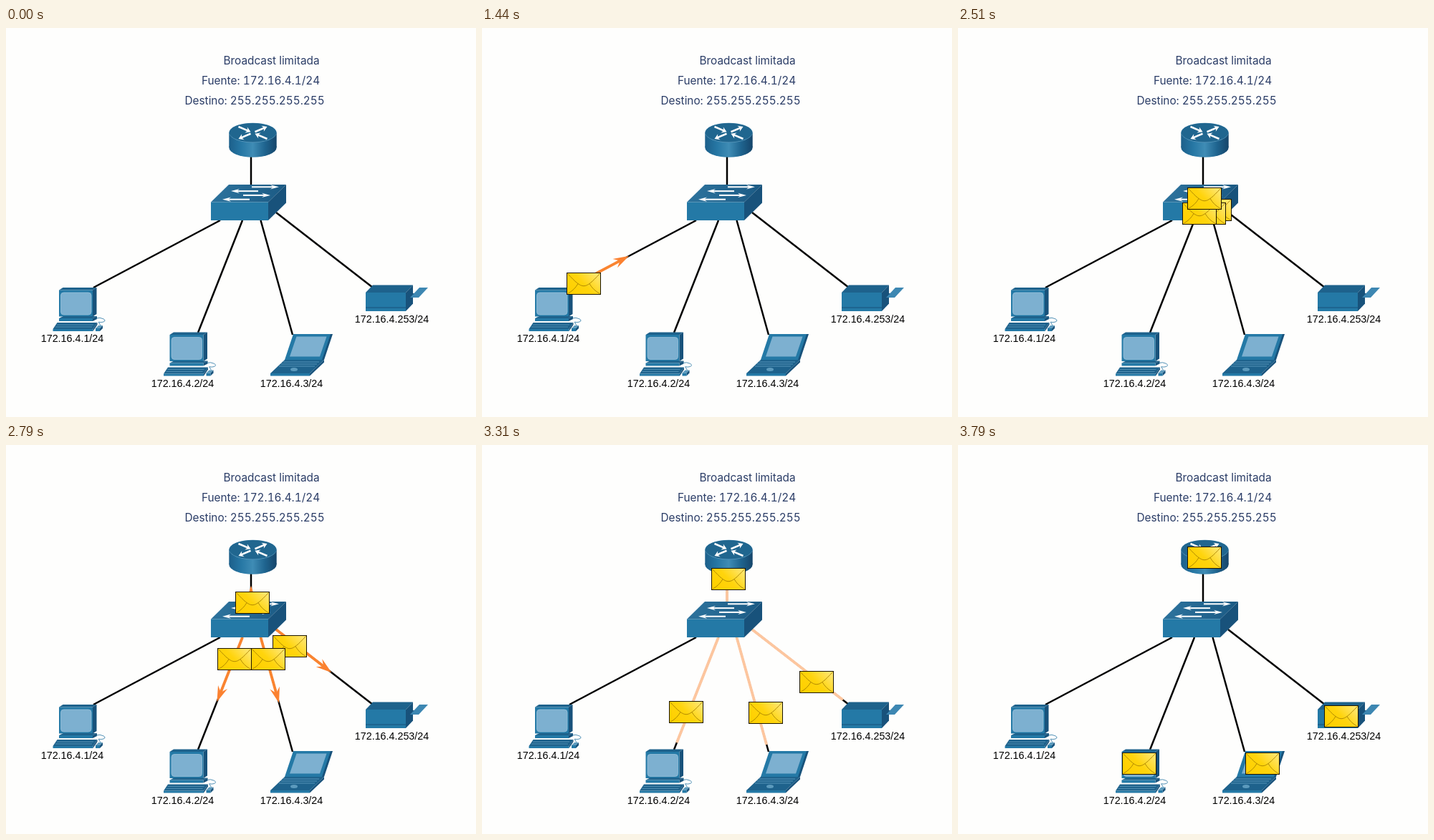
Write an HTML page with a canvas that moves like this. It is 656 by 544 pixels and loops after 4890 ms.

```html
<!DOCTYPE html>
<html lang="es">
<head>
<meta charset="utf-8">
<title>Broadcast limitada</title>
<style>
html, body { margin: 0; width: 100%; height: 100%; overflow: hidden; background: #fefefd; }
canvas, svg { position: absolute; left: 0; top: 0; width: 656px; height: 544px; }
.title { font: 15.35px Inter, sans-serif; font-variant-numeric: tabular-nums; fill: #2a3c66; }
.host { font: 14.3px "Liberation Sans", Arial, sans-serif; text-anchor: middle; }
</style>
</head>
<body>
<canvas id="stage" width="656" height="544"></canvas>
<svg viewBox="0 0 656 544">
  <g class="title">
    <text x="303.5" y="51">Broadcast limitada</text>
    <text x="273" y="79">Fuente: 172.16.4.1/24</text>
    <text x="249.5" y="107">Destino: 255.255.255.255</text>
  </g>
  <g class="host">
    <text x="92.5" y="439">172.16.4.1/24</text>
    <text x="246.5" y="502">172.16.4.2/24</text>
    <text x="398.5" y="502">172.16.4.3/24</text>
    <text x="538.5" y="412">172.16.4.253/24</text>
  </g>
</svg>
<script>
const ctx = document.getElementById('stage').getContext('2d');
const LOOP = 4890;
const BLUE = '#2479a6', DARK = '#1e628c', DEEP = '#18527b', LIGHT = '#5c9abd', SCREEN = '#7db0d0';

const clamp = v => Math.min(1, Math.max(0, v));
const span = (t, a, b) => clamp((t - a) / (b - a));
const lerp = (a, b, p) => a + (b - a) * p;
const between = (a, b, p) => a.map((v, i) => lerp(v, b[i], p));

function at([x, y], angle, draw) {
  ctx.save();
  ctx.translate(x, y);
  ctx.rotate(angle);
  draw();
  ctx.restore();
}

function line(a, b, color, width) {
  ctx.beginPath();
  ctx.moveTo(...a);
  ctx.lineTo(...b);
  ctx.strokeStyle = color;
  ctx.lineWidth = width;
  ctx.stroke();
}

function ellipse(x, y, rx, ry, fill) {
  ctx.beginPath();
  ctx.ellipse(x, y, rx, ry, 0, 0, Math.PI * 2);
  ctx.fillStyle = fill;
  ctx.fill();
}

function ramp(x0, y0, x1, y1, ...colors) {
  const g = ctx.createLinearGradient(x0, y0, x1, y1);
  colors.forEach((c, i) => g.addColorStop(i / (colors.length - 1), c));
  return g;
}

// Parallelogram spanned from a corner by two edges
function facet(fill, x, y, ax, ay, bx, by) {
  ctx.beginPath();
  ctx.moveTo(x, y);
  ctx.lineTo(x + ax, y + ay);
  ctx.lineTo(x + ax + bx, y + ay + by);
  ctx.lineTo(x + bx, y + by);
  ctx.fillStyle = fill;
  ctx.fill();
}

// Box seen from the front, its depth going to the upper right
function slab(x, y, w, h, dx, dy, top = DARK) {
  facet(top, x, y, w, 0, dx, -dy);
  facet(DEEP, x + w, y, 0, h, dx, -dy);
  facet(BLUE, x, y, w, h ? 0 : 1, 0, h);
}

// Arrow along x with swept barbs
function arrow(len, shaft, head, barb, fill) {
  const neck = len - head * 0.65;
  ctx.fillStyle = fill;
  ctx.fillRect(0, -shaft / 2, neck + 1, shaft);
  ctx.beginPath();
  ctx.moveTo(len, 0);
  ctx.lineTo(len - head, -barb);
  ctx.lineTo(neck, 0);
  ctx.lineTo(len - head, barb);
  ctx.fill();
}

function router() {
  const cx = 344.5, top = 146.5, rx = 33.2, ry = 13.7, h = 20.5;
  const side = ramp(cx - rx, 0, cx + rx, 0, '#1c5f8a', '#2677a4', '#3f8cb5', '#1f6590', '#15456a');
  ellipse(cx, top + h, rx, ry, side);
  ctx.fillRect(cx - rx, top, rx * 2, h);
  ellipse(cx, top, rx, ry, LIGHT);
  ellipse(cx, top - 0.3, rx - 0.3, ry - 0.5, '#20668f');
  // One diagonal points inwards, the other outwards
  for (const sx of [-1, 1]) for (const sy of [-1, 1]) {
    const inner = [cx + sx * 3, top + sy * 1.3], outer = [cx + sx * 20, top + sy * 8.5];
    const [a, b] = sx === sy ? [outer, inner] : [inner, outer];
    at(a, Math.atan2(b[1] - a[1], b[0] - a[0]), () => arrow(18.5, 2.6, 7, 4.3, '#fff'));
  }
}

function hub() {
  slab(286, 243.5, 80, 25.5, 25, 24.5, ramp(300, 0, 391, 0, '#2b709a', '#1b5a84'));
  for (let i = 0; i < 4; i++) {
    const right = i % 2 === 0, x = (right ? 343 : 358) - i * 6;
    at([x, 222.3 + i * 5.8], right ? 0 : Math.PI, () => arrow(38, 2, 12, 3.1, '#fff'));
  }
}

function desktop() {
  slab(9, 3.5, 47, 37, 5.5, 3.5);
  ctx.beginPath();
  ctx.roundRect(11.5, 7, 42.5, 31, 4);
  ctx.fillStyle = SCREEN;
  ctx.fill();
  ctx.strokeStyle = '#98c1da';
  ctx.lineWidth = 0.8;
  ctx.stroke();
  slab(9, 43, 47, 4, 6, 3);
  slab(0.5, 58, 56, 3, 6, 9);
  for (let i = 1; i < 3; i++) line([8 - i * 2, 49 + i * 3], [59 - i * 2, 49 + i * 3], LIGHT, 0.8);
  slab(60, 57, 6, 4, 4, 4, LIGHT);
  ctx.beginPath();
  ctx.ellipse(66, 45.5, 7, 3, 0.1, -2.4, 1.8);
  ctx.lineTo(67, 53);
  ctx.strokeStyle = '#3d84ad';
  ctx.lineWidth = 0.9;
  ctx.stroke();
}

function laptop() {
  facet(DEEP, 392, 464, 52, 0, 12, -36);
  facet(BLUE, 389, 464, 52, 0, 12, -36);
  facet(SCREEN, 396, 459.5, 42, 0, 9.5, -28);
  slab(369, 483, 55, 3.5, 20, 19);
  for (let i = 0; i < 3; i++) line([387 - i * 3, 467 + i * 3], [437 - i * 3, 467 + i * 3], LIGHT, 0.9);
  ellipse(402, 477.5, 5, 2.5, LIGHT);
}

function printer() {
  slab(502, 370, 56, 26, 10, 10.5);
  line([502, 391], [558, 391], DEEP, 1);
  facet(DEEP, 560, 377, 10, 0, 8, -6);
  facet('#3d87b2', 564, 377, 12, 0, 13, -14);
}

function envelope([cx, cy], alpha) {
  const w = 47, h = 30;
  at([Math.round(cx - 24) + 0.5, Math.round(cy - 15.5) + 0.5], 0, () => {
    ctx.globalAlpha = alpha;
    ctx.fillStyle = ramp(8, h, w - 8, 0, '#ffd000', '#ffd40c', '#ffe56a');
    ctx.fillRect(0, 0, w, h);
    ctx.beginPath();
    ctx.moveTo(1, 1);
    ctx.bezierCurveTo(w * 0.48, h * 0.8, w * 0.52, h * 0.8, w - 1, 1);
    for (const s of [-1, 1]) {
      ctx.moveTo(w / 2 + s * 22.5, h - 1);
      ctx.quadraticCurveTo(w / 2 + s * 13, h * 0.8, w / 2 + s * 8, h / 2);
    }
    ctx.strokeStyle = '#a98200';
    ctx.lineWidth = 0.9;
    ctx.stroke();
    ctx.strokeStyle = '#1c1600';
    ctx.lineWidth = 1;
    ctx.strokeRect(0, 0, w, h);
  });
}

const HOME = [98, 383], HUB = [343.7, 244.5];
const uplink = { from: [122, 363], to: [299, 269] };
// Painted in this order, so the last packet lies on top
const routes = [
  { from: [377, 258], to: [512, 363], end: [534.5, 379] },
  { from: [355.5, 269], to: [400, 429], end: [425, 445.5] },
  { from: [330, 269], to: [268, 426], end: [253, 445] },
  { from: [342, 219], to: [342, 180], end: [344, 157] }
];

// Grows along the wire from t = 0, then pales and loses its head
function signal({ from, to }, t, grow) {
  if (t <= 0 || t >= grow + 520) return;
  const dx = to[0] - from[0], dy = to[1] - from[1];
  const len = Math.hypot(dx, dy) * 0.985 * clamp(t / grow);
  const pale = 0.7 * span(t, grow - 50, grow + 420);
  const color = `rgb(${[250, 132, 48].map(c => Math.round(lerp(c, 255, pale))).join()})`;
  at(from, Math.atan2(dy, dx), () => {
    line([0, 0], [Math.max(0, len - 8), 0], color, 3.8);
    ctx.globalAlpha = 1 - span(t, grow, grow + 220);
    const k = Math.min(1, len / 22);
    arrow(len, 0, 22 * k, 7 * k, '#fb8130');
  });
}

function packets(t) {
  if (t < 2410) {
    envelope(between(HOME, HUB, span(t, 1230, 2396)), span(t, 750, 1150));
    return;
  }
  const p = t >= 3790 ? 1 : span(t, 2410, 3805);
  for (const r of routes) envelope(between(HUB, r.end, p), 1);
}

function draw(t) {
  ctx.fillStyle = '#fefefd';
  ctx.fillRect(0, 0, 656, 544);
  for (const w of [uplink, ...routes]) line(w.from, w.to, '#000', 2.5);
  signal(uplink, t - 1150, 610);
  for (const r of routes) signal(r, t - 2500, 500);
  router();
  hub();
  at([65, 363], 0, desktop);
  at([219.5, 425.5], 0, desktop);
  laptop();
  printer();
  if (t >= 790) packets(t);
}

const start = performance.now();
function tick() {
  draw((performance.now() - start) % LOOP);
  requestAnimationFrame(tick);
}
tick();
</script>
</body>
</html>
```
